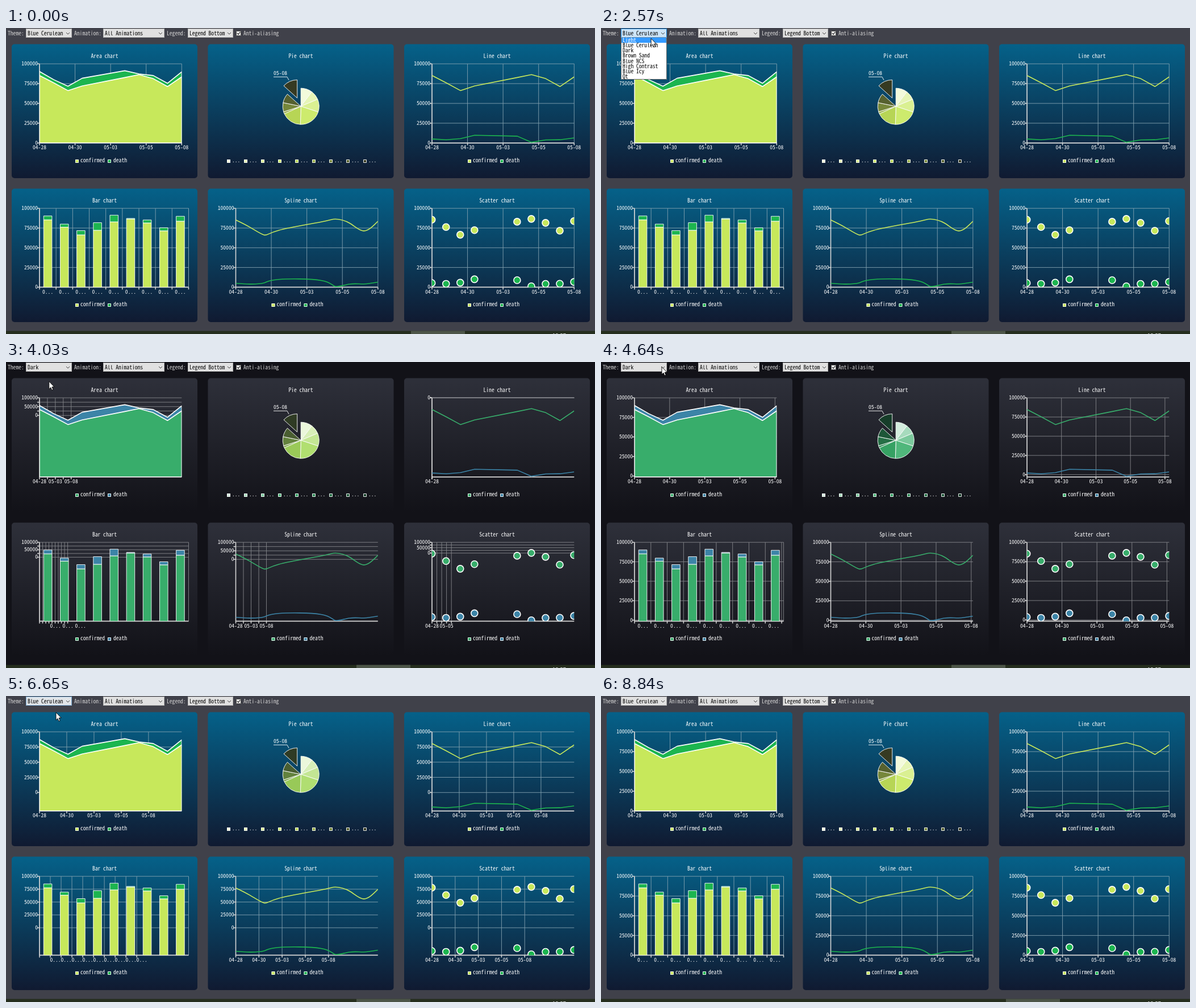
An HTML page with a canvas that plays this animation: 1037 px wide and 540 px high, repeating every 8900 ms.

```html
<!DOCTYPE html>
<html lang="en">
<head>
<meta charset="utf-8">
<title>Chart themes</title>
<style>
html, body { margin: 0; width: 100%; height: 100%; overflow: hidden; background: #40434a; }
canvas { display: block; }
</style>
</head>
<body>
<canvas id="stage" width="1037" height="540"></canvas>
<script>
const g = document.getElementById('stage').getContext('2d');
const LOOP = 8900, TO_DARK = 3800, TO_BLUE = 6100;

const BLUE = {
  name: 'Blue Cerulean', window: '#40414a', top: '#056189', bottom: '#101a31', grid: '#84a2b0',
  main: [199, 232, 91], second: '#1cb54f', deep: [54, 58, 34],
  delay: [246, 246, 246, 319, 319, 319]
};
const DARK = {
  name: 'Dark', window: '#121218', top: '#2e303a', bottom: '#121218', grid: '#86878c',
  main: [56, 173, 107], second: '#3c84a7', deep: [22, 61, 41],
  delay: [170, 170, 256, 180, 172, 195]
};
const THEMES = ['Light', 'Blue Cerulean', 'Dark', 'Brown Sand', 'Blue NCS', 'High Contrast', 'Blue Icy', 'Qt'];
const ROW = 9.25, ROW_TOP = 16.9;

const days = [0, 1, 2, 3, 6, 7, 8, 9, 10];
const confirmed = [85300, 76000, 66200, 72000, 82700, 86300, 81300, 71300, 83500];
const death = [5000, 4000, 5500, 9800, 8600, 900, 3900, 4100, 6400];
const total = confirmed.map((v, i) => v + death[i]);
const dates = ['04-28', '04-30', '05-03', '05-05', '05-08'];

// time, x, y of the pointer tip
const path = [
  [610, 905, 528], [685, 760, 470], [760, 560, 380], [835, 350, 270], [910, 203, 188],
  [1080, 203, 188], [1160, 120, 95], [1250, 55, 25], [1330, 27, 5], [1470, 67, 3.5],
  [1560, 85, 4], [1700, 107, 4], [1850, 107, 4], [2010, 109, 4], [2240, 109, 4],
  [2700, 80, 24], [3030, 73, 30], [3110, 73, 31], [3260, 73, 37], [3950, 73, 37],
  [4300, 85, 25], [4640, 107, 8.5], [4960, 108, 8.5], [5300, 95, 20], [5640, 88, 29],
  [6670, 88, 29], [7110, 130, 90], [7500, 420, 330], [7970, 760, 545]
];
const clicks = [[2160, 2240], [3720, 3800], [4880, 4960], [6030, 6100]];

const within = (t, a, b) => t >= a && t < b;
const rgb = c => `rgb(${c.map(Math.round)})`;
const mix = (a, b, k) => a.map((v, i) => v + (b[i] - v) * k);

// Pick the size at which the fixed-pitch face advances 4.8px.
const FACE = '"Noto Sans Mono CJK SC", "Liberation Mono", monospace';
g.font = `10px ${FACE}`;
const FONT = `${48 / g.measureText('0').width}px ${FACE}`;

function text(s, x, y, color = '#fff', align = 'left') {
  g.font = FONT;
  g.textAlign = align;
  g.fillStyle = color;
  g.fillText(s, x, y);
}

function box(x, y, w, h, fill, stroke) {
  g.fillStyle = fill;
  g.fillRect(x, y, w, h);
  if (!stroke) return;
  g.strokeStyle = stroke;
  g.lineWidth = 0.9;
  g.strokeRect(x + 0.5, y + 0.5, w - 1, h - 1);
}

function line(points, color, width) {
  g.beginPath();
  points.forEach(([x, y]) => g.lineTo(x, y));
  g.strokeStyle = color;
  g.lineWidth = width;
  g.lineJoin = 'round';
  g.stroke();
}

function panel(theme, x, y, h, title) {
  const grad = g.createLinearGradient(0, y, 0, y + h);
  grad.addColorStop(0, theme.top);
  grad.addColorStop(1, theme.bottom);
  g.fillStyle = grad;
  g.beginPath();
  g.roundRect(x, y, 327, h, 5);
  g.fill();
  text(title, x + 163.5, y + 24, '#fff', 'center');
}

function legend(theme, x, y) {
  box(x + 112, y - 2, 6, 6, rgb(theme.main), '#fff');
  text('confirmed', x + 121, y + 3);
  box(x + 169, y - 2, 6, 6, theme.second, '#fff');
  text('death', x + 179, y + 3);
}

function axes(theme, p, e, bars) {
  const right = p.x + p.w, bottom = p.y + p.h;
  let last = Infinity;
  for (let i = 0; i < 5; i++) {
    const y = p.y + p.h * (1 - i / 4) * e;
    line([[p.x, y], [right, y]], theme.grid, 0.9);
    line([[p.x - 4, y], [p.x, y]], '#d6d6d6', 1.5);
    if (last - y < 9) continue;
    text(String(i * 25000), p.x - 3, y + 3, '#fff', 'right');
    last = y;
  }
  const steps = bars ? 9 : 4;
  last = -Infinity;
  for (let i = 0; i <= steps; i++) {
    const x = p.x + p.w * i / steps * e;
    line([[x, p.y], [x, bottom]], theme.grid, 0.9);
    line([[x, bottom], [x, bottom + 4]], '#d6d6d6', 1.5);
    const at = bars ? x + 14.6 + 13.5 * Math.min(1, (1 - e) / 0.35) : x;
    if (at - last < (bars ? 17 : 24) || (bars && i === steps)) continue;
    text(bars ? '0...' : dates[i], at, bottom + 11.5, '#fff', 'center');
    last = at;
  }
  if (bars) line([[right, p.y], [right, bottom]], theme.grid, 0.9);
  line([[p.x, p.y], [p.x, bottom], [right, bottom]], '#d6d6d6', 1.6);
}

const plotPoints = (p, values) => values.map((v, i) => [p.x + p.w * days[i] / 10, p.y + p.h * (1 - v / 1e5)]);

function drawArea(theme, p) {
  [[total, theme.second], [confirmed, rgb(theme.main)]].forEach(([values, color]) => {
    const pts = plotPoints(p, values);
    const shape = [[p.x, p.y + p.h], ...pts, [p.x + p.w, p.y + p.h], [p.x, p.y + p.h]];
    g.fillStyle = color;
    g.beginPath();
    shape.forEach(q => g.lineTo(...q));
    g.fill();
    line(shape, '#fff', 1.6);
  });
}

function drawLine(theme, p) {
  line(plotPoints(p, confirmed), rgb(theme.main), 1.6);
  line(plotPoints(p, death), theme.second, 1.6);
}

function drawBars(theme, p) {
  const step = p.w / 9, k = p.h / 1e5;
  confirmed.forEach((v, i) => {
    const x = p.x + step * (i + 0.25), mid = p.y + p.h - v * k;
    const bar = (y, h, color) => {
      g.fillStyle = color;
      g.fillRect(x, y, step / 2, h);
      g.strokeStyle = '#fff';
      g.lineWidth = 0.9;
      g.strokeRect(x, y, step / 2, h);
    };
    bar(mid - death[i] * k, death[i] * k, theme.second);
    bar(mid, v * k, rgb(theme.main));
  });
}

// First control points of a natural cubic spline through the values.
function controls(v) {
  const n = v.length - 1, out = [], tmp = [];
  let b = 2;
  out[0] = (v[0] + 2 * v[1]) / b;
  for (let i = 1; i < n; i++) {
    tmp[i] = 1 / b;
    b = (i < n - 1 ? 4 : 3.5) - tmp[i];
    const rhs = i < n - 1 ? 4 * v[i] + 2 * v[i + 1] : (8 * v[i] + v[n]) / 2;
    out[i] = (rhs - out[i - 1]) / b;
  }
  for (let i = n - 1; i > 0; i--) out[i - 1] -= tmp[i] * out[i];
  return out;
}

function spline(pts, color) {
  const n = pts.length - 1;
  const c = [0, 1].map(k => controls(pts.map(q => q[k])));
  g.beginPath();
  g.moveTo(...pts[0]);
  for (let i = 0; i < n; i++) {
    const end = [0, 1].map(k => i < n - 1 ? 2 * pts[i + 1][k] - c[k][i + 1] : (pts[n][k] + c[k][i]) / 2);
    g.bezierCurveTo(c[0][i], c[1][i], ...end, ...pts[i + 1]);
  }
  g.strokeStyle = color;
  g.lineWidth = 1.6;
  g.stroke();
}

function drawSpline(theme, p) {
  spline(plotPoints(p, confirmed), rgb(theme.main));
  spline(plotPoints(p, death), theme.second);
}

function drawScatter(theme, p) {
  [[confirmed, rgb(theme.main)], [death, theme.second]].forEach(([values, color]) => {
    plotPoints(p, values).forEach(([x, y]) => {
      g.beginPath();
      g.arc(x - 0.3, y - 0.4, 6, 0, 7);
      g.fillStyle = color;
      g.fill();
      g.strokeStyle = '#fff';
      g.lineWidth = 1.6;
      g.stroke();
    });
  });
}

function sliceColor(theme, i) {
  const k = (i + 1) / 9 * 2;
  return k < 1 ? mix([255, 255, 255], theme.main, k) : mix(theme.main, theme.deep, k - 1);
}

function drawPie(theme, old, e) {
  const sum = death.reduce((a, b) => a + b);
  let a = -Math.PI / 2;
  death.forEach((v, i) => {
    const b = a + v / sum * Math.PI * 2, m = (a + b) / 2, out = i === 8 ? 16 : 0;
    const x = 519.2 + Math.cos(m) * out, y = 138.2 + Math.sin(m) * out;
    g.beginPath();
    g.moveTo(x, y);
    g.arc(x, y, 32, a, b);
    g.closePath();
    g.fillStyle = rgb(mix(sliceColor(old, i), sliceColor(theme, i), e));
    g.fill();
    g.strokeStyle = '#fff';
    g.lineWidth = 0.9;
    g.lineJoin = 'round';
    g.stroke();
    a = b;
    box(389 + i * 30, 232, 6, 6, rgb(sliceColor(theme, i)), '#fff');
    text('...', 398 + i * 30, 237);
  });
  text('05-08', 471, 83);
  line([[471, 86.3], [495, 86.3], [498, 92]], '#fff', 0.9);
}

const charts = [
  ['Area chart', drawArea], ['Pie chart'], ['Line chart', drawLine],
  ['Bar chart', drawBars], ['Spline chart', drawSpline], ['Scatter chart', drawScatter]
];

function combo(x, w, label, fill = '#e1e1e1', edge = '#adadad') {
  box(x, 1, w, 16, fill, edge);
  text(label, x + 3, 12.5, '#000');
  line([[x + w - 10, 8], [x + w - 7, 11], [x + w - 4, 8]], '#444', 1);
}

function toolbar(t, theme, open) {
  const grey = '#d6d6d6';
  let look = [];
  if (open) look = ['#cce4f7', '#0078d7'];
  else if (within(t, 1390, 2240)) look = ['#e5f1fb', '#0078d7'];
  else if (within(t, TO_BLUE, 8750)) look = ['#e1e5e9', '#6fa3d0'];
  text('Theme:', 3, 12.5, grey);
  combo(35, 81, theme.name, ...look);
  text('Animation:', 120, 12.5, grey);
  combo(171, 108, 'All Animations');
  text('Legend:', 283, 12.5, grey);
  combo(320, 80, 'Legend Bottom');
  box(405, 5, 9, 9, '#fff', '#333');
  line([[407, 9], [409, 11.3], [412.3, 6.8]], '#222', 1.2);
  text('Anti-aliasing', 418, 12.5, grey);
}

function popup(theme, y) {
  const over = y >= ROW_TOP ? Math.floor((y - ROW_TOP) / ROW) : THEMES.indexOf(theme.name);
  box(35, 16.5, 81, 74.5, '#fff', '#555');
  THEMES.forEach((name, i) => {
    const top = ROW_TOP + i * ROW;
    if (i === over) box(36, top, 79, ROW, '#3399ff');
    text(name, 38, top + 7.7, i === over ? '#fff' : '#000');
  });
}

function taskbar(t) {
  box(0, 534.6, 1037, 5.4, '#252e1e');
  box(within(t, 2160, 8750) ? 617 : 713, 534.6, 95, 5.4, '#4c5548');
  g.font = '9.5px "Liberation Sans", sans-serif';
  g.textAlign = 'left';
  g.fillStyle = '#fff';
  g.fillText('10:27', 962, 545);
}

function pointerAt(t) {
  const i = path.findIndex(k => k[0] > t);
  if (i === 0) return [-50, -50];
  if (i < 0) return path[path.length - 1].slice(1);
  const a = path[i - 1], b = path[i];
  return mix(a.slice(1), b.slice(1), (t - a[0]) / (b[0] - a[0]));
}

function pointer(t, [x, y]) {
  if (clicks.some(c => within(t, ...c))) {
    g.fillStyle = 'rgba(255, 240, 0, 0.7)';
    g.beginPath();
    g.arc(x, y + 2.5, 8.5, 0, 7);
    g.fill();
  }
  g.beginPath();
  [[0, 0], [0, 13.5], [3, 10.7], [5, 15.5], [7.2, 14.5], [5.2, 9.8], [9.2, 9.6]]
    .forEach(([dx, dy]) => g.lineTo(x + dx, y + dy));
  g.closePath();
  g.fillStyle = '#fff';
  g.fill();
  g.strokeStyle = '#000';
  g.lineWidth = 0.9;
  g.stroke();
}

function draw(t) {
  const dark = within(t, TO_DARK, TO_BLUE);
  const theme = dark ? DARK : BLUE, old = dark ? BLUE : DARK;
  const since = t < TO_DARK ? LOOP : t - (dark ? TO_DARK : TO_BLUE);
  const open = within(t, 2240, TO_DARK) || within(t, 4880, TO_BLUE);
  const tip = pointerAt(t);
  box(0, 0, 1037, 540, theme.window);

  charts.forEach(([title, series], i) => {
    const x = 10 + (i % 3) * 345.5, low = i > 2;
    const y = low ? 283.5 : 28.5;
    const k = Math.min(1, Math.max(0, (since - theme.delay[i]) / 1000));
    const ease = 1 - (1 - k) ** 4;
    panel(theme, x, y, low ? 235.5 : 236.5, title);
    if (!series) return drawPie(theme, old, ease);
    const p = { x: x + 49, y: low ? 318.2 : 63.2, w: i === 3 ? 262.5 : 250.3, h: low ? 139.2 : 139.7 };
    // The old layout stays until the axes restart from the corner.
    axes(theme, p, since < 150 ? 1 : ease, i === 3);
    g.save();
    g.beginPath();
    g.rect(p.x, p.y, p.w, p.h);
    g.clip();
    series(theme, p);
    g.restore();
    legend(theme, x, low ? 488 : 234);
  });

  toolbar(t, theme, open);
  if (open) popup(theme, tip[1]);
  taskbar(t);
  pointer(t, tip);
}

const start = performance.now();
function tick() {
  draw((performance.now() - start) % LOOP);
  requestAnimationFrame(tick);
}
tick();
</script>
</body>
</html>
```
